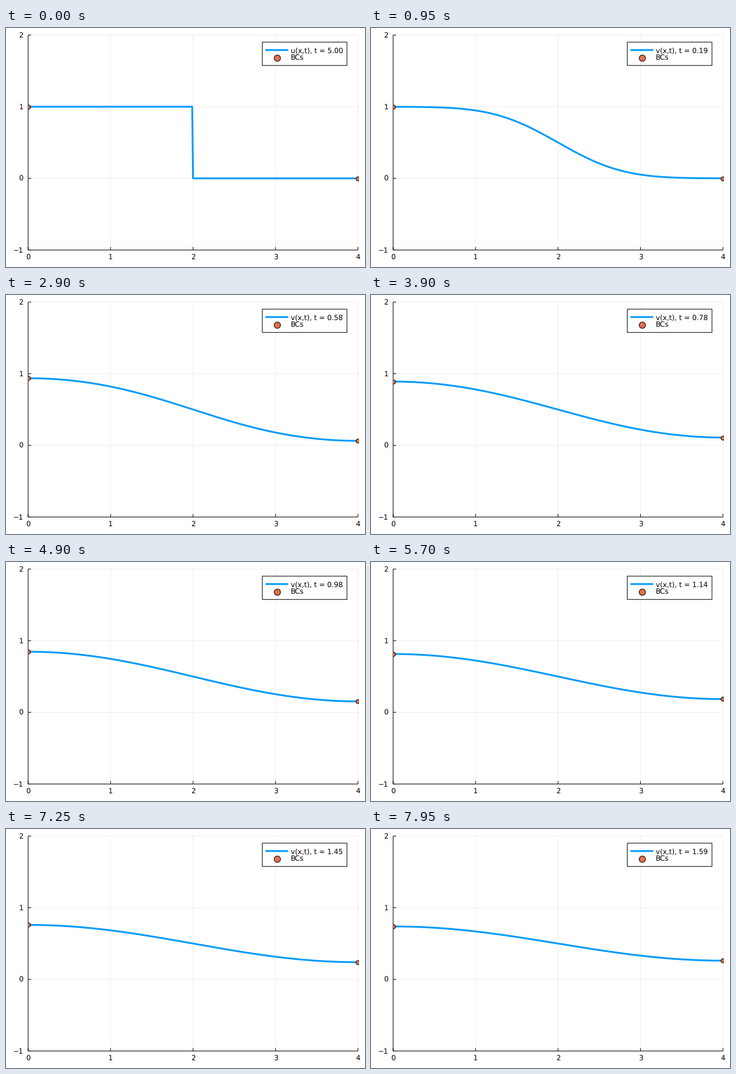
A matplotlib script that plays this animation: 600 by 400 pixels, repeating every 8000 ms.

```python
import numpy as np
import matplotlib.pyplot as plt
from matplotlib.animation import FuncAnimation
from matplotlib.patches import Rectangle

W, H, DPI = 600, 400, 100
FRAMES, INTERVAL = 160, 50
LEFT, RIGHT, TOP, BOTTOM = 37.0, 588.2, 11.8, 371.6
BLUE, ORANGE = "#009AFA", "#E36F47"
PT = 72 / DPI  # points per pixel

plt.rcParams.update({
    "font.family": "DejaVu Sans",
    "font.size": 11.8 * PT,
    "text.hinting": "none",
    "path.snap": False,
})

fig = plt.figure(figsize=(W / DPI, H / DPI), dpi=DPI, facecolor="white")
ax = fig.add_axes([0, 0, 1, 1])
ax.set_xlim(0, W)
ax.set_ylim(H, 0)
ax.axis("off")


def px(x):
    return LEFT + np.asarray(x) * (RIGHT - LEFT) / 4


def py(y):
    return BOTTOM - (np.asarray(y) + 1) * (BOTTOM - TOP) / 3


def stroke(xs, ys, color="black", width=1.0, z=2, cap="butt"):
    return ax.plot(xs, ys, color=color, lw=width * PT, zorder=z,
                   solid_capstyle=cap, solid_joinstyle="round")[0]


def dots(xs, ys, size, z):
    return ax.plot(xs, ys, "o", ms=size * PT, mfc=ORANGE, mec="black",
                   mew=1.0 * PT, zorder=z)[0]


def label(x, y, text, ha="left", z=8):
    return ax.text(x, y, text, ha=ha, va="baseline", zorder=z)


# Grid, axes and tick labels
for k in range(5):
    x = px(k)
    stroke([x, x], [TOP, BOTTOM], "#EEEEEE", 1, 1)
    stroke([x, x], [BOTTOM, BOTTOM - 5], z=2)
    label(x, 387.4, str(k), "center")
for k in range(-1, 3):
    y = py(k)
    stroke([LEFT, RIGHT], [y, y], "#EEEEEE", 1, 1)
    stroke([LEFT, LEFT + 5], [y, y], z=2)
    label(29, y + 4.3, str(k).replace("-", "\u2212"), "right")
stroke([LEFT, LEFT, RIGHT], [TOP, BOTTOM, BOTTOM], z=2)

# Curve and boundary points, clipped to the plot area
frame = Rectangle((LEFT - 0.5, TOP), RIGHT - LEFT + 1, BOTTOM - TOP,
                  transform=ax.transData)
curve = stroke([], [], BLUE, 3, 3)
ends = dots([], [], 7, 4)
for artist in (curve, ends):
    artist.set_clip_path(frame)

# Legend
ax.add_patch(Rectangle((428.3, 23.7), 141.6, 39, fc="white", ec="black",
                       lw=1.0 * PT, zorder=6))
stroke([433.5, 471.7], [36.9, 36.9], BLUE, 3, 7)
dots([452.6], [49.6], 10.6, 7)
title = label(476.3, 41.1, "")
label(476.3, 54.1, "BCs")

# Heat equation with insulated ends, started from a unit step at x = 2
x = np.linspace(0, 4, 401)
n = np.arange(1, 200, 2)
rate = (n * np.pi / 4) ** 2
coef = 2 / (n * np.pi) * np.sin(n * np.pi / 2)
modes = np.cos(np.outer(x, n) * np.pi / 4)


def heat(t):
    return 0.5 + modes @ (coef * np.exp(-rate * t))


def update(i):
    if i == 0:
        u, text = np.where(np.arange(401) < 200, 1.0, 0.0), "u(x,t), t = 5.00"
    else:
        t = i / 100
        u, text = heat(t), f"v(x,t), t = {t:.2f}"
    curve.set_data(px(x), py(u))
    ends.set_data(px([0, 4]), py(u[[0, -1]]))
    title.set_text(text)
    return curve, ends, title


anim = FuncAnimation(fig, update, frames=FRAMES, interval=INTERVAL,
                     repeat=True, repeat_delay=0)
plt.show()
```
